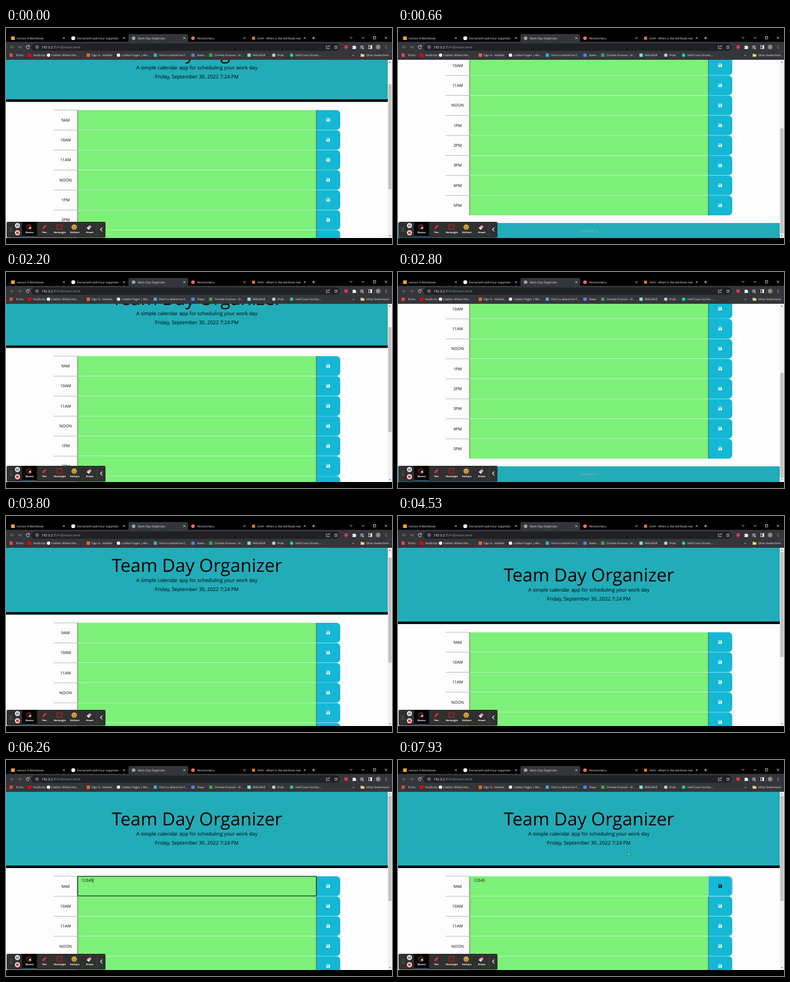
Recreate the animation shown at these times as an HTML page. Size 640 px wide and 360 px high, loop 8000 ms.

```html
<!DOCTYPE html>
<html lang="en">
<head>
<meta charset="utf-8">
<title>Day planner demo</title>
<style>
  html, body { margin: 0; height: 100%; overflow: hidden; background: #000; }
  svg { display: block; }
  #stage { width: 100vw; height: 100vh; }
  text { font-family: "Open Sans", "Noto Sans", sans-serif; text-rendering: geometricPrecision; white-space: pre; }
  #chrome text { font-weight: 500; }
</style>
</head>
<body>
<svg id="stage" viewBox="0 0 640 360"></svg>
<script>
const TEAL = '#22acb8', GREEN = '#7cf079', BLUE = '#14b8d4', BAR = '#35363a', PALE = '#f1f3f4';
const LOOP = 8000, MAX_SCROLL = 182.4;
const ROW_TOP = 193.4, ROW_H = 33.333, LEFT = 79.2, FIELD = 118.8, BUTTON = 514.6, RIGHT = 554.2;

const rect = (x, y, w, h, fill, extra = '') =>
  `<rect x="${x}" y="${y}" width="${w}" height="${h}" fill="${fill}" ${extra}/>`;
const dot = (x, y, r, fill, extra = '') => `<circle cx="${x}" cy="${y}" r="${r}" fill="${fill}" ${extra}/>`;
const line = (d, stroke = PALE, width = .8, extra = '') =>
  `<path d="${d}" fill="none" stroke="${stroke}" stroke-width="${width}" ${extra}/>`;
const text = (x, y, str, size, fill = '#000', extra = '') =>
  `<text x="${x}" y="${y}" font-size="${size}" fill="${fill}" ${extra}>${str}</text>`;
const centred = (x, y, str, size, fill, extra = '') =>
  text(x, y, str, size, fill, `text-anchor="middle" ${extra}`);
const square = (x, y, fill, s = 6) => rect(x - s / 2, y - s / 2, s, s, fill);

function tabs() {
  const list = [
    [18, 'Lesson 4 Workbook', square(11.5, 17, '#f5a623')],
    [118, 'Dorvane41/job-hour-organizer', dot(111.5, 17, 3.2, '#fff')],
    [218, 'Team Day Organizer', dot(211.5, 17, 3, '#9aa0a6')],
    [317, 'Recolumetry', dot(310, 17, 3, '#f06a5c')],
    [417, 'html - When is the attribute nee', square(410.5, 17, '#e8762c', 5)]
  ];
  const active = `<path d="M200 24Q203 24 203 21V13Q203 10 206 10H299Q302 10 302 13V21Q302 24 305 24Z" fill="${BAR}"/>`;
  return active + list.map(([x, label, icon], i) => {
    const c = 96 + i * 99.8;
    return icon + text(x, 18.7, label, 4.85, PALE) + line(`M${c - 1.6} 15.2l3.2 3.2m0-3.2l-3.2 3.2`, PALE, .7);
  }).join('') +
    line('M507.5 16.8h5m-2.5-2.5v5') +
    line('M570.3 15.2l1.9 1.9 1.9-1.9M590 16.4h4M628.2 14.6l3.6 3.6m0-3.6l-3.6 3.6') +
    rect(609.4, 14.6, 3.6, 3.6, 'none', `stroke="${PALE}" stroke-width=".7"`);
}

function addressBar() {
  return rect(0, 23, 640, 30, BAR) +
    rect(42, 25.7, 511, 12.3, '#202124', 'rx="6.1"') +
    line('M12.7 31.8h-5.2m2.4-2.4l-2.4 2.4 2.4 2.4M20.3 31.8h5.2m-2.4-2.4l2.4 2.4-2.4 2.4', '#85878b') +
    line('M38.2 30.2a2.6 2.6 0 1 0 .4 2.4M38.6 28.8v2h-2') +
    dot(51.5, 31.8, 2.3, 'none', `stroke="${PALE}" stroke-width=".6"`) +
    line('M51.5 31.4v1.6M51.5 30.1v.6', PALE, .6) +
    text(59, 33.7, `192.0.2.7<tspan fill="#9aa0a6">:4100/start.html</tspan>`, 5.5, PALE) +
    line('M533 30h-1.8v4.4h4.8v-1.6M533 32.4q.4-2.4 3.6-2.4m-1.2-1.5l1.5 1.5-1.5 1.5', PALE, .6) +
    line('M547.3 29l.8 1.9 2 .2-1.5 1.3.5 2-1.8-1.1-1.8 1.1.5-2-1.5-1.3 2-.2z', PALE, .6) +
    dot(564, 31.8, 3.1, '#e0344b') +
    `<path d="M574.5 30h1.7a1 1 0 0 1 2 0h1.7v1.7a1 1 0 0 1 0 2v1.4h-5.4v-1.6a1 1 0 0 0 0-1.8z" fill="${PALE}"/>` +
    line('M587.5 30h5m-5 1.8h5m-5 1.8h2.4') + `<path d="M591 32.6l2.5 1.4-2.5 1.4z" fill="${PALE}"/>` +
    rect(601.4, 29.2, 5.2, 5.2, 'none', `stroke="${PALE}" stroke-width=".8"`) + rect(604.2, 29.2, 2.4, 5.2, PALE) +
    dot(617, 31.8, 3.8, '#8d8981') +
    [29.8, 31.8, 33.8].map(y => dot(630, y, .6, PALE)).join('');
}

function bookmarks() {
  const list = [
    [8.5, 16, 'Trimo', '#e8463a'], [39, 45, 'VoxDrum', '#f00'],
    [70.5, 75, 'CodVar: Where the...', '#fff', 1], [136.5, 142, 'Sign in · KodVex', '#f0682b'],
    [186.5, 192, 'CodVar Pages | We...', '#fff', 1], [247.5, 254, 'Plurn is where the f...', '#3fa8d8'],
    [310, 317, 'News', '#4a86e8'], [339.5, 346, 'Ormelo Finance - St...', '#34a853'],
    [403, 409, 'REEL6EVE', '#7ce0d0'], [444, 450, 'Prob.', '#c5c8cc', 1],
    [473.5, 480, 'Half-Court Scores,...', '#12d6a0', 1]
  ];
  return list.map(([icon, x, label, color, round]) =>
    (round ? dot(icon, 45.3, 2.8, color) : square(icon, 45.3, color, 5.5)) + text(x, 47, label, 4.7, PALE)).join('') +
    text(574.5, 47, '»', 5.5, PALE) +
    `<path d="M588 42.9h2.4l.8.8h3v4h-6.2z" fill="#f5d27a"/>` + text(597, 47, 'Other bookmarks', 4.65, PALE);
}

const disk = (x, y) =>
  `<path class="disk" transform="translate(${x} ${y})" fill="#fff" fill-rule="evenodd"
    d="M-2.3-2.9H1.5L2.9-1.5V2.3Q2.9 2.9 2.3 2.9H-2.3Q-2.9 2.9-2.9 2.3V-2.3Q-2.9-2.9-2.3-2.9Z
       M-2.1-2.1V-.5H1.2V-2.1ZM-.9 1.2A.9.9 0 1 0 .9 1.2A.9.9 0 1 0-.9 1.2Z"/>`;

const buttonPath = y =>
  `M${BUTTON} ${y}H${RIGHT - 6.2}a6.2 6.2 0 0 1 6.2 6.2v${ROW_H - 12.8}a6.2 6.2 0 0 1-6.2 6.2H${BUTTON}Z`;

function row(label, i) {
  const y = ROW_TOP + i * ROW_H, top = y + .42, bottom = y + ROW_H, mid = y + ROW_H / 2;
  return line(`M${LEFT} ${y + .4}H${FIELD}`, '#000', .45, 'stroke-dasharray="1.2 .8"') +
    centred(98.8, mid + 2.6, label, 6.67) +
    rect(FIELD, top, BUTTON - FIELD, ROW_H - .42, GREEN) +
    `<path d="${buttonPath(top)}" fill="${BLUE}"/>` +
    line(`M${FIELD} ${top}V${bottom}M${BUTTON} ${top}V${bottom}`, '#000', .5) +
    disk(534.2, mid);
}

function page() {
  const hours = ['9AM', '10AM', '11AM', 'NOON', '1PM', '2PM', '3PM', '4PM', '5PM'];
  return rect(0, 53, 633, 480, '#fdfdfd') +
    rect(0, 53, 633, 123, TEAL) + rect(0, 175.9, 633, 4.2, '#000') +
    centred(316.5, 109, 'Team Day Organizer', 30) +
    centred(316.5, 126, 'A simple calendar app for scheduling your work day', 8.33) +
    centred(316.5, 141, 'Friday, September 30, 2022 7:24 PM', 8.33) +
    hours.map(row).join('') +
    `<path id="ring" d="${buttonPath(ROW_TOP + .45)}" fill="none" stroke="#9cc8ee" stroke-width="1.3"/>` +
    rect(FIELD, ROW_TOP + .5, BUTTON - FIELD, ROW_H - .6, 'none', 'id="focus" rx=".8" stroke="#000" stroke-width="1"') +
    text(125, 203.3, '', 6.67, '#000', 'id="entry"') +
    rect(0, 197.3, .6, 7.4, '#000', 'id="caret"') +
    rect(0, 506.3, 633, 27, TEAL) + centred(316.5, 521.6, 'Copyright ©', 5.6, '#86b4b8');
}

const scrollbar = () =>
  rect(633, 53, 7, 297, '#f1f1f1') + rect(633.8, 60, 5.4, 175, '#c1c1c1', 'id="thumb"') +
  '<path d="M634.9 57.6l1.6-1.9 1.6 1.9zM634.9 345.4l1.6 1.9 1.6-1.9z" fill="#505050"/>';

function recorder() {
  const labels = ['Mouse', 'Pen', 'Rectangle', 'Stickers', 'Eraser'];
  const grip = [333, 336, 339].map(y => dot(6.8, y, .6, '#aaa') + dot(9.2, y, .6, '#aaa')).join('');
  return rect(1, 323, 164, 26.4, '#303030', 'rx="2"') + grip +
    rect(26.5, 323, 25, 26, '#050505') + rect(26.5, 347.2, 25, 1, '#4f8fb0') +
    dot(19, 329.3, 4.2, '#e4e4e4') + line('M17.8 327.5v3.6m2.4-3.6v3.6', '#222', 1) +
    dot(19, 341.3, 4.2, '#e4e4e4') + square(19, 341.3, '#e02828', 4) +
    dot(38, 331.4, 3.6, 'none', 'stroke="#e23b3b" stroke-width="1"') +
    '<path d="M38 330.6l4.6 3-2 .4-.9 2z" fill="#fff"/>' +
    '<path d="M60 335.5l.8-2.8 4.4-4.4 2 2-4.4 4.4z" fill="#f02b2b"/>' +
    rect(84.6, 328, 8, 7.4, 'none', 'stroke="#d81c1c" stroke-width="1"') +
    dot(113, 331.8, 4.4, '#efb23a') + dot(111.3, 330.8, .7, '#222') + dot(114.7, 330.8, .7, '#222') +
    line('M110.6 333q2.4 2.4 4.8 0', '#222', .8) +
    '<path d="M134 333.4l4.6-5 3.4 2.8-4.6 5z" fill="#f19a9a"/><path d="M134 333.4l1.7-1.9 3.4 2.8-1.7 1.9z" fill="#f5f0f0"/>' +
    labels.map((s, i) => centred(39 + i * 25, 342.3, s, 4, '#fff', 'font-weight="700"')).join('') +
    line('M151.5 323.5V349', '#555', .6) + line('M159.5 332.6l-2.8 3.2 2.8 3.2', '#fff', 1.1);
}

document.getElementById('stage').innerHTML =
  rect(0, 0, 640, 360, '#000') + `<g id="chrome">${tabs()}${addressBar()}${bookmarks()}</g>` +
  `<svg x="0" y="53" width="633" height="297" viewBox="0 53 633 297"><g id="page">${page()}</g></svg>` +
  scrollbar() + recorder() + rect(0, 350, 640, 10, '#000') +
  '<path id="cursor" d="M0 0V5l1.2-1 .8 1.7.8-.4-.8-1.6h1.5z" fill="#fff" stroke="#000" stroke-width=".4"/>';

const [pageEl, thumb, ring, focusBox, entry, caret, cursor] =
  ['page', 'thumb', 'ring', 'focus', 'entry', 'caret', 'cursor'].map(id => document.getElementById(id));
const firstDisk = document.querySelector('.disk');
const show = (el, on) => el.setAttribute('visibility', on ? 'visible' : 'hidden');

// Keys are [time, value]; movement between them is eased.
function ease(keys, t) {
  const next = keys.findIndex(k => k[0] > t);
  if (next < 0) return keys[keys.length - 1][1];
  if (next === 0) return keys[0][1];
  const [t0, a] = keys[next - 1], [t1, b] = keys[next];
  const u = (t - t0) / (t1 - t0);
  return a + (b - a) * u * u * (3 - 2 * u);
}

const scrollKeys = [[0, 57], [700, MAX_SCROLL], [950, MAX_SCROLL], [1859, 0], [1950, 0],
  [2650, MAX_SCROLL], [2850, MAX_SCROLL], [4011, 0]];
const cursorX = [[6400, 300], [6950, 533], [7350, 533], [7900, 381.3]];
const cursorY = [[6400, 212], [6950, 211], [7350, 211], [7900, 154.6]];
const FOCUS = 4950, TYPE = 5300, KEY_GAP = 180, HOVER = 6900, CLICK = 7100;

function draw(t) {
  const scroll = ease(scrollKeys, t);
  pageEl.setAttribute('transform', `translate(0 ${-scroll})`);
  thumb.setAttribute('y', 60 + scroll * 108 / MAX_SCROLL);

  const typed = Math.max(0, Math.min(5, Math.floor((t - TYPE) / KEY_GAP) + 1));
  const lastKey = typed ? TYPE + (typed - 1) * KEY_GAP : FOCUS;
  const focused = t >= FOCUS && t < CLICK;
  entry.textContent = '12345'.slice(0, typed);
  caret.setAttribute('x', 125.2 + typed * 3.815);
  show(caret, focused && (t - lastKey) % 1000 < 500);
  show(focusBox, focused);
  show(ring, t >= CLICK);
  firstDisk.setAttribute('fill', t >= HOVER ? '#000' : '#fff');

  show(cursor, t >= 6400);
  cursor.setAttribute('transform', `translate(${ease(cursorX, t)} ${ease(cursorY, t)})`);
}

const start = performance.now();
function tick() {
  draw((performance.now() - start) % LOOP);
  requestAnimationFrame(tick);
}
tick();
</script>
</body>
</html>
```
